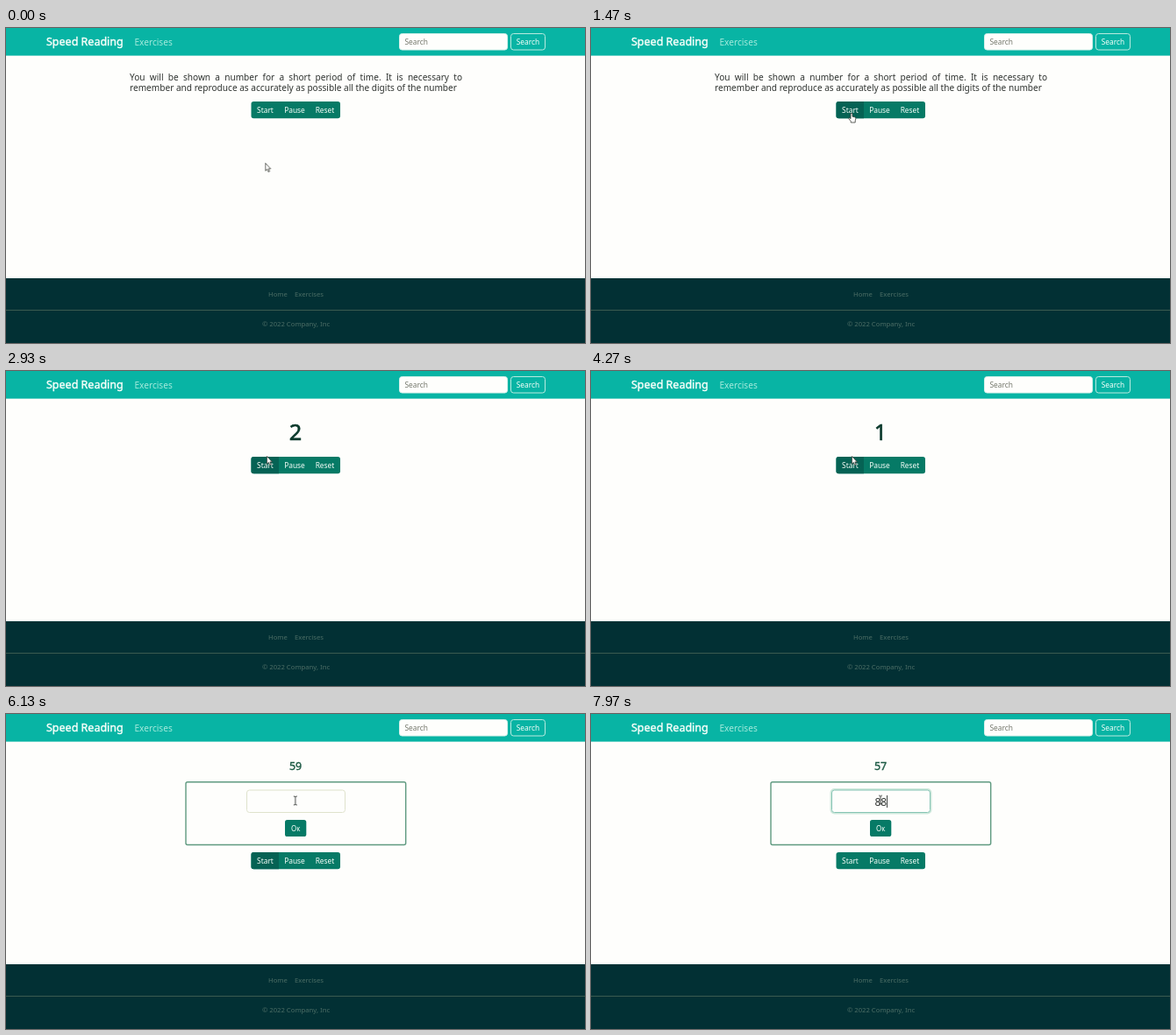
Animation of 660 by 360 pixels, one loop 8000 ms. Source, as an HTML page:

```html
<!DOCTYPE html>
<html lang="en">
<head>
<meta charset="utf-8">
<title>Speed Reading</title>
<style>
  html, body { margin: 0; width: 100%; height: 100%; overflow: hidden; background: #fefefc; }
  svg { position: absolute; left: 0; top: 0; display: block; }
  svg, p { font-family: "Noto Sans", "Open Sans", sans-serif; }
  p { position: absolute; left: 141px; top: 50px; width: 379px; margin: 0;
      font-size: 10.1px; line-height: 12.2px; text-align: justify; color: #2f3330; }
  .mid { text-anchor: middle; }
  .small { font-size: 8.4px; }
  .foot { font-size: 7.7px; fill: #4d6e66; }
  .light { fill: #f8fffa; }
  /* A thin outline gives a medium weight. */
  .brand { font-size: 12.5px; stroke: #f8fffa; stroke-width: .4; }
  .count { font-size: 25.3px; fill: #0b3a2c; stroke: #0b3a2c; stroke-width: .6; }
  .timer { font-size: 12.4px; fill: #1c5a44; stroke: #1c5a44; stroke-width: .4; }
  .digits { font-size: 12px; fill: #2f3330; }
  .field { fill: #fefefc; }
  .button { fill: #067a66; }
  .pressed { fill: #056254; }
  .line { fill: none; stroke: #2f3330; stroke-width: .9; }
</style>
</head>
<body>
<p data-show="0 1880">You will be shown a number for a short period of time. It is necessary to remember and reproduce as accurately as possible all the digits of the number</p>

<svg width="660" height="360" viewBox="0 0 660 360">
  <!-- Header -->
  <rect width="660" height="31.6" fill="#08b4a4"/>
  <text class="light brand" x="46" y="20.4">Speed Reading</text>
  <text x="146.5" y="19.6" font-size="10.1" fill="#a4eadc">Exercises</text>
  <rect class="field" x="448.5" y="6.5" width="123" height="18.5" rx="3" stroke="#d6f0ea"/>
  <text class="small" x="454.5" y="18.9" fill="#74776c">Search</text>
  <rect x="575.5" y="6.5" width="39" height="18.5" rx="3" fill="none" stroke="#b9ebe0"/>
  <text class="small light mid" x="595" y="18.9">Search</text>

  <!-- Footer -->
  <rect y="286" width="660" height="74" fill="#023034"/>
  <rect y="322" width="660" height="1" fill="#3b5a50"/>
  <text class="foot" x="299" y="307.3">Home</text>
  <text class="foot" x="329" y="307.3">Exercises</text>
  <text class="foot mid" x="330.5" y="340.6">© 2022 Company, Inc</text>

  <!-- Countdown -->
  <g class="mid">
    <text class="count" x="330" y="79" data-show="1880 2890">3</text>
    <text class="count" x="330" y="79" data-show="2890 3900">2</text>
    <text class="count" x="330" y="79" data-show="3900 4910">1</text>
    <text class="timer" x="330" y="64.2" data-show="4910 5910">60</text>
    <text class="timer" x="330" y="64.2" data-show="5910 6910">59</text>
    <text class="timer" x="330" y="64.2" data-show="6910 7910">58</text>
    <text class="timer" x="330" y="64.2" data-show="7910 8000">57</text>
  </g>

  <!-- Answer panel -->
  <g data-show="4910 8000">
    <rect x="205" y="77.7" width="250.7" height="71.8" rx="2" fill="none" stroke="#5f9a80" stroke-width="1.4"/>
    <rect class="button" x="318" y="121" width="24.3" height="19" rx="2.6"/>
    <text class="light mid" x="330.2" y="133.6" font-size="8">Ок</text>
  </g>
  <text class="digits mid" x="330.3" y="101.3" data-show="4910 5910">885</text>
  <rect class="field" x="274.5" y="87" width="112" height="25.5" rx="3" stroke="#dfe2cc" data-show="5910 6600"/>
  <g data-show="6600 8000">
    <rect x="273.5" y="86" width="114" height="27.5" rx="4" fill="none" stroke="#cfe9dc" stroke-width="2"/>
    <rect class="field" x="274.5" y="87" width="112" height="25.5" rx="3" stroke="#86c4b4"/>
  </g>
  <text class="digits mid" x="330.3" y="104.7" data-show="7300 7750">8</text>
  <text class="digits mid" x="330.3" y="104.7" data-show="7750 8000">88</text>
  <rect x="330" y="93" width=".9" height="14" fill="#2f3330" data-show="6600 7100"/>
  <rect x="334" y="93" width=".9" height="14" fill="#2f3330" data-show="7300 7750"/>
  <rect x="337" y="93" width=".9" height="14" fill="#2f3330" data-show="7750 8000"/>

  <!-- Control buttons -->
  <g id="controls">
    <rect class="button" x="279.5" y="84" width="101.5" height="19.3" rx="2.8"/>
    <path class="pressed" d="M311 84H282.3a2.8 2.8 0 0 0-2.8 2.8v13.7a2.8 2.8 0 0 0 2.8 2.8H311z" data-show="1000 6600"/>
    <g class="small light mid">
      <text x="295.5" y="97">Start</text>
      <text x="329" y="97">Pause</text>
      <text x="363.5" y="97">Reset</text>
    </g>
  </g>

  <!-- Pointer, with its hot spot at the local zero point -->
  <g id="pointer">
    <g fill="#fefefc" stroke="#3a3d38" stroke-width=".8" stroke-linejoin="round">
      <path d="M.4 .4V9.2L2.4 7.4L3.8 10.5L5.2 9.9L3.9 6.9H6.4z" data-show="0 1000"/>
      <path d="M.4 .4V9.2L2.4 7.4L3.8 10.5L5.2 9.9L3.9 6.9H6.4z" data-show="1880 5910"/>
      <path d="M-1 .9Q0-.4 1 .9V4.2L3.5 4.8Q5 5.2 4.8 6.7L4.2 9V11H-.8V9.6L-3.3 6.6Q-3 5.2-1.8 6L-1 6.8z" data-show="1000 1880"/>
    </g>
    <path class="line" d="M-2-3Q0-3 0-2Q0-3 2-3M0-2V6M-2 7Q0 7 0 6Q0 7 2 7" data-show="5910 8000"/>
  </g>
</svg>

<script>
  const LOOP = 8000;

  // Each stop is [time, styles, easing until the next stop].
  function play(element, stops) {
    const frames = stops.map(([time, styles, easing = 'step-end']) =>
      ({ ...styles, offset: time / LOOP, easing }));
    if (frames[frames.length - 1].offset < 1) {
      frames.push({ ...stops[stops.length - 1][1], offset: 1 });
    }
    element.animate(frames, { duration: LOOP, iterations: Infinity }).startTime = 0;
  }

  const at = (x, y) => ({ transform: `translate(${x}px, ${y}px)` });

  for (const element of document.querySelectorAll('[data-show]')) {
    const [from, to] = element.dataset.show.split(' ').map(Number);
    const stops = [[from, { opacity: 1 }], [to, { opacity: 0 }]];
    if (from > 0) stops.unshift([0, { opacity: 0 }]);
    play(element, stops);
  }

  play(document.getElementById('controls'), [
    [0, at(0, 0)], [1880, at(0, 14)], [4910, at(0, 74)]
  ]);

  play(document.getElementById('pointer'), [
    [0, at(295.3, 154)],
    [500, at(295.3, 154), 'ease-in-out'],
    [1150, at(297, 97)],
    [4950, at(297, 97), 'ease-out'],
    [5050, at(298, 95)],
    [5250, at(298, 95), 'ease-in-out'],
    [5950, at(329.8, 97)],
    [6300, at(329.8, 97), 'ease-out'],
    [6450, at(330, 96.3)]
  ]);
</script>
</body>
</html>
```
